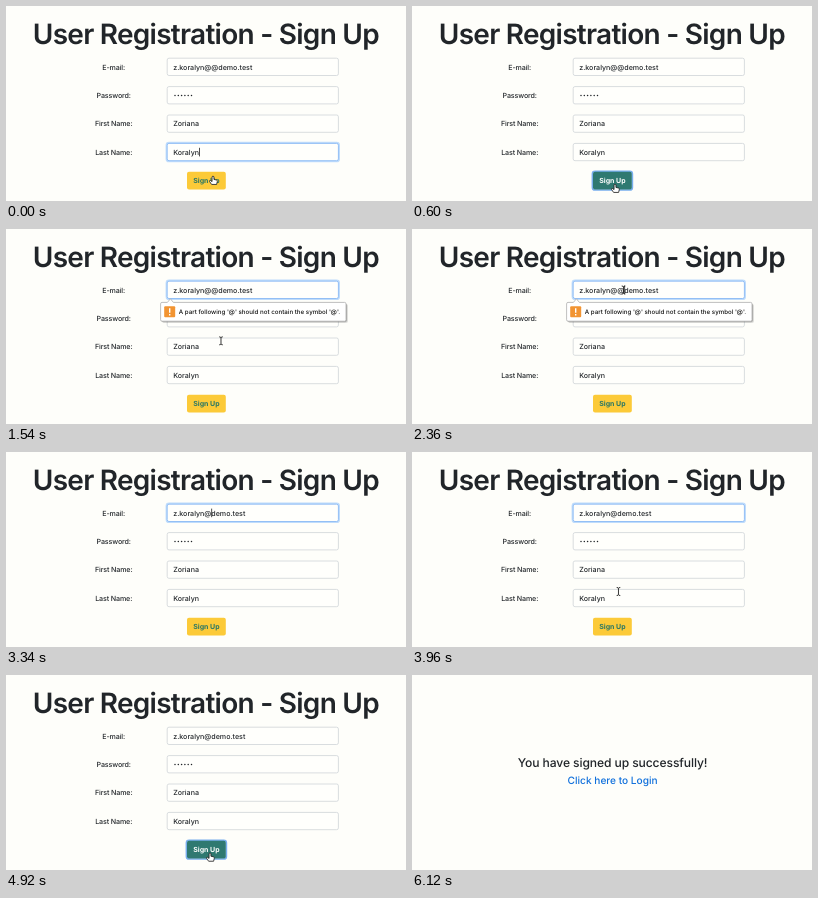
Recreate the animation shown at these times as an HTML page. Size 400 px wide and 195 px high, loop 6340 ms.

```html
<!DOCTYPE html>
<html lang="en">
<head>
<meta charset="utf-8">
<title>Sign Up</title>
<style>
  html, body { margin: 0; width: 100%; height: 100%; overflow: hidden; background: #fefefa; }
  svg { display: block; width: 100%; height: 100%; }
  text {
    font-family: Inter, Roboto, "Open Sans", sans-serif;
    font-size: 7.1px;
    font-weight: 450;
    font-optical-sizing: none;
    text-rendering: geometricPrecision;
    fill: #212529;
  }
  .mid { text-anchor: middle; }
  .label { font-weight: 500; letter-spacing: -.12px; }
  .title { font-size: 28px; font-weight: 600; letter-spacing: -.74px; }
  .box { fill: #fffffc; stroke: #d0d5d9; stroke-width: .8; }
  .box.focus { stroke: #80b4f4; }
  .ring { fill: none; stroke: #bfdcfb; stroke-width: 2; }
  .tip text { font-size: 6.18px; font-weight: 500; fill: #111; }
  .done { font-size: 12.1px; font-weight: 500; letter-spacing: -.1px; }
  .link { font-size: 10.15px; font-weight: 500; fill: #1070dc; }
  #signText { font-size: 7px; font-weight: 700; }
</style>
</head>
<body>
<svg viewBox="0 0 400 195" xmlns="http://www.w3.org/2000/svg">
  <g id="form">
    <text class="title mid" x="199.9" y="37.6">User Registration - Sign Up</text>
    <g id="fields"></g>
    <rect id="caret" width=".8" height="8.6" fill="#222"/>
    <rect id="signRing" x="180.4" y="165.2" width="40" height="18.8" rx="2.6" fill="none" stroke="#78aeee" stroke-width="1.6"/>
    <rect id="sign" x="181" y="165.8" width="38.8" height="17.6" rx="2"/>
    <text id="signText" class="mid" x="200.4" y="177.2">Sign Up</text>
    <g id="tip" class="tip">
      <rect x="156" y="75" width="186" height="19" rx="2" fill="#000" opacity=".12"/>
      <rect x="155.4" y="74.4" width="185.6" height="18.8" rx="2" fill="#000" opacity=".2"/>
      <path d="M156 73.4H161.4L164.4 69.8L167.4 73.4H338.6Q340 73.4 340 74.8V90.8Q340 92.2 338.6 92.2H156Q154.6 92.2 154.6 90.8V74.8Q154.6 73.4 156 73.4Z" fill="#fff" stroke="#a5a5a5" stroke-width=".7"/>
      <rect x="158.2" y="77.2" width="11" height="11" rx="1" fill="#f29432"/>
      <path d="M163.7 79.2V83.8M163.7 85.1V86.5" stroke="#fff" stroke-width="1.4"/>
      <text x="172.8" y="85.1">A part following '@' should not contain the symbol '@'.</text>
    </g>
    <g id="pointer">
      <path id="hand" transform="scale(.86)" d="M-1.1 .8Q0 -.6 1.1 .8V4L4 4.6Q5.2 5 5 6.4L4.2 9.8H-1.6L-4 6.4Q-4.4 5 -3 5.2L-1.1 6.5Z" fill="#fff" stroke="#1c1c1c" stroke-width=".95" stroke-linejoin="round"/>
      <path id="beam" d="M-1.8 -4Q0 -4 0 -3V3Q0 4 -1.8 4M1.8 -4Q0 -4 0 -3M0 3Q0 4 1.8 4" fill="none" stroke="#222" stroke-width=".9"/>
      <path id="arrow" d="M0 0V7.6L1.8 6L3 8.7L4.2 8.2L3 5.5H5.4Z" fill="#111" stroke="#fff" stroke-width=".6"/>
    </g>
  </g>
  <g id="success">
    <text class="done mid" x="200.6" y="91.8">You have signed up successfully!</text>
    <text class="link mid" x="200.6" y="108.8">Click here to Login</text>
  </g>
</svg>
<script>
const LOOP = 6340;
const $ = id => document.getElementById(id);
const show = (el, on) => { el.style.display = on ? '' : 'none'; };
const clamp = v => Math.min(1, Math.max(0, v));
const within = (t, a, b) => t >= a && t < b;
const ramp = (t, a, b) => clamp((t - a) / (b - a));

const ease = {
  in: p => p * p,
  out: p => 1 - (1 - p) ** 2,
  both: p => p * p * (3 - 2 * p)
};

// Pointer hot spot: time, x, y, easing towards this point
const path = [
  [0, 207, 170],
  [420, 203, 178, 'both'],
  [1300, 203, 178, 'both'],
  [1540, 215, 112, 'in'],
  [2120, 211.5, 61, 'out'],
  [3580, 211.5, 61, 'both'],
  [4200, 204, 178.4, 'both'],
  [4860, 204, 178.4, 'both'],
  [4920, 204, 177.8, 'both'],
  [LOOP, 204, 177.8, 'both']
];

// Moments of the story
const BLUR = 560, INVALID = 800, CLICK = 2500, ERASE = 3180, SUBMIT = 4700, DONE = 5340;

const MAIL = { wrong: 'z.koralyn@@demo.test', right: 'z.koralyn@demo.test' };
const fieldTop = i => 52.2 + 28.4 * i;
const FIELD_H = 17.3;

const rows = [['E-mail:', MAIL.wrong], ['Password:', ''], ['First Name:', 'Zoriana'], ['Last Name:', 'Koralyn']];

const dots = y => Array.from({ length: 6 }, (_, i) =>
  `<circle cx="${169 + 3.3 * i}" cy="${y}" r=".76" fill="#212529"/>`).join('');

$('fields').innerHTML = rows.map(([label, value], i) => {
  const y = fieldTop(i), base = y + 11.3;
  return `<text class="label mid" x="107.7" y="${base}">${label}</text>
    <rect class="ring" x="160.6" y="${y - .6}" width="172.4" height="${FIELD_H + 1.2}" rx="2.4"/>
    <rect class="box" x="161.2" y="${y}" width="171.2" height="${FIELD_H}" rx="1.8"/>
    <text class="value" x="167.2" y="${base}">${value}</text>${i === 1 ? dots(y + 9) : ''}`;
}).join('');

const rings = document.querySelectorAll('.ring');
const boxes = document.querySelectorAll('.box');
const values = document.querySelectorAll('.value');

function pointerAt(t) {
  const i = Math.max(1, path.findIndex(k => k[0] > t));
  const [t0, x0, y0] = path[i - 1], [t1, x1, y1, kind] = path[i];
  const p = ease[kind](ramp(t, t0, t1));
  return [x0 + (x1 - x0) * p, y0 + (y1 - y0) * p];
}

function mix(a, b, p) {
  return `rgb(${a.map((v, i) => Math.round(v + (b[i] - v) * p))})`;
}

function drawFocus(t) {
  const focus = t < BLUR ? 3 : within(t, INVALID, SUBMIT) ? 0 : -1;
  boxes.forEach((b, i) => {
    b.classList.toggle('focus', i === focus);
    show(rings[i], i === focus);
  });
  show($('signRing'), within(t, BLUR, INVALID) || t >= SUBMIT);

  const mail = t < ERASE ? MAIL.wrong : MAIL.right;
  if (values[0].textContent !== mail) values[0].textContent = mail;

  // The blink restarts at each focus, click or key press
  const start = [ERASE, CLICK, INVALID, 0].find(s => t >= s);
  show($('caret'), focus >= 0 && (t - start) % 1060 < 540);
  if (focus < 0) return;
  const count = focus === 3 ? 7 : mail.lastIndexOf('@') + 1;
  $('caret').setAttribute('x', 167.2 + values[focus].getSubStringLength(0, count));
  $('caret').setAttribute('y', fieldTop(focus) + 4.4);
}

function drawButton(t) {
  const hover = ramp(t, 20, 170) - ramp(t, 1390, 1530) + ramp(t, 4070, 4220);
  $('sign').setAttribute('fill', mix([252, 202, 56], [47, 121, 113], hover));
  $('signText').style.fill = mix([42, 119, 101], [255, 255, 255], hover);
}

function drawTip(t) {
  const scale = .9 + .1 * ease.out(ramp(t, 860, 1060));
  $('tip').setAttribute('opacity', ramp(t, 860, 960) - ramp(t, ERASE, 3330));
  $('tip').setAttribute('transform', `translate(155 72) scale(${scale}) translate(-155 -72)`);
}

function drawPointer(t) {
  const [x, y] = pointerAt(t);
  const onButton = within(y, 165, 185);
  const onField = rows.some((_, i) => within(y, fieldTop(i), fieldTop(i) + FIELD_H));
  $('pointer').setAttribute('transform', `translate(${x} ${y})`);
  show($('pointer'), !within(t, ERASE, 3580));
  show($('hand'), onButton);
  show($('beam'), onField);
  show($('arrow'), !onButton && !onField);
}

function draw(now) {
  const t = now % LOOP;
  show($('form'), t < DONE);
  show($('success'), t >= DONE);
  if (t >= DONE) return;
  drawFocus(t);
  drawButton(t);
  drawTip(t);
  drawPointer(t);
}

const begin = performance.now();
function tick() {
  draw(performance.now() - begin);
  requestAnimationFrame(tick);
}
tick();
</script>
</body>
</html>
```
